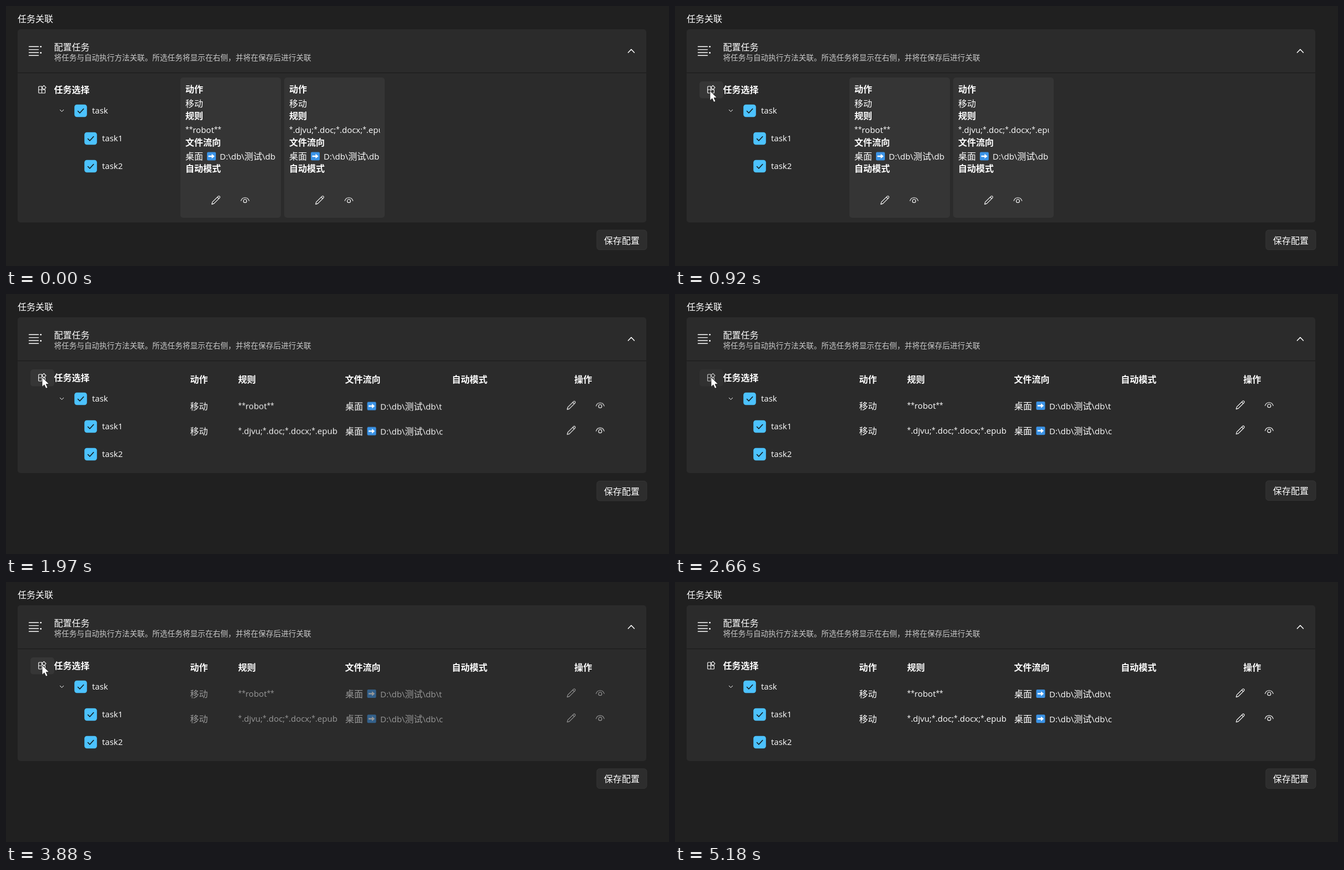
An HTML page that plays this animation: 1194 px wide and 469 px high, repeating every 5510 ms.

```html
<!DOCTYPE html>
<html lang="zh-CN">
<head>
<meta charset="utf-8">
<title>任务关联</title>
<style>
html, body { margin: 0; width: 100%; height: 100%; overflow: hidden; background: #202020; }
svg { display: block; width: 100%; height: 100%; }
text { font: 15px "Open Sans", "Noto Sans CJK SC", "Noto Sans CJK", sans-serif; fill: #fff; }
.bold { font-weight: 700; }
.cjk { font-size: 16px; }
.star { font-size: 12px; baseline-shift: 2px; }
.note, .note .cjk { font-size: 13.64px; fill: #c8c8c8; }
.line { fill: none; stroke: #fff; stroke-width: 1.1; stroke-linecap: round; stroke-linejoin: round; }
</style>
</head>
<body>
<svg id="stage" viewBox="0 0 1194 469"></svg>
<script>
const LOOP = 5510;
const SWAPS = [
  { at: 1490, view: 'table', span: 690, slide: 20 },
  { at: 2820, view: 'cards', span: 320, slide: 0 },
  { at: 3880, view: 'table', span: 300, slide: 0 },
];
const PRESSES = [[1330, 1490], [2660, 2820], [3720, 3880]];
// Pointer stops: time, x, y
const POINTER = [
  [80, 560, 0], [200, 420, 90], [320, 200, 220], [440, 60, 305], [560, 74, 186],
  [600, 74, 186], [920, 63, 153], [1320, 63, 153], [1330, 65, 150], [4280, 65, 150],
  [4320, 160, 117], [4400, 303, 68], [4600, 600, -24],
];

// CJK, Latin and asterisk runs use slightly different sizes.
const runs = s => s.replace(/\*|[^\x00-\x7f]+/g,
  m => `<tspan class="${m === '*' ? 'star' : 'cjk'}">${m}</tspan>`);
const text = (x, y, s, cls = '') => `<text x="${x}" y="${y}" class="${cls}">${runs(s)}</text>`;
const rect = (x, y, w, h, fill, r = 0, more = '') =>
  `<rect x="${x}" y="${y}" width="${w}" height="${h}" rx="${r}" fill="${fill}" ${more}/>`;
const line = (d, more = '') => `<path class="line" d="${d}" ${more}/>`;
const at = (x, y, s) => `<g transform="translate(${x} ${y})">${s}</g>`;

const pencil = (x, y) => at(x, y, line('M-7.4 7.6L-6.3 3.7L4 -6.6Q5.4 -7.9 6.8 -6.6Q8 -5.3 6.8 -3.9L-3.5 6.4ZM2.6 -5.2L5.4 -2.5'));
const eye = (x, y) => at(x, y,
  line('M-7.3 1.4C-5 -6.2 5 -6.2 7.3 1.4') + '<circle class="line" cy="1.7" r="3"/>');
const arrow = (x, y) => at(x, y,
  rect(-8, -7.5, 16, 15, '#3b93e6', 2) +
  '<path d="M-5.5 -1.2H.5V-4.3L5.7 0L.5 4.3V1.2H-5.5Z" fill="#fff"/>');
const check = (x, y, label) =>
  rect(x - 11.3, y - 11.3, 22.6, 22.6, '#4cc2ff', 4.5) +
  at(x, y, line('M-5 .5L-1.6 4L5.2 -3.4', 'style="stroke:#111;stroke-width:1.5"')) +
  text(x + 20.5, y + 5, label);

const card = (x, rule) => at(x, 0,
  rect(0, 129, 181, 253, '#353535', 5) +
  text(9, 156, '动作', 'bold') + text(9, 182.3, '移动') +
  text(9, 204, '规则', 'bold') +
  `<g clip-path="url(#cardClip)">${text(9, 229, rule)}</g>` +
  text(9, 251.5, '文件流向', 'bold') + text(9, 277, '桌面') + arrow(56, 271) +
  text(71, 277, 'D:\\db\\测试\\db') +
  text(9, 299, '自动模式', 'bold') + pencil(64, 350) + eye(116.5, 350));

const row = (y, rule, path) =>
  text(331.5, y + 6, '移动') + text(418, y + 5.5, rule) +
  text(611, y + 6, '桌面') + arrow(658.5, y) +
  `<g clip-path="url(#pathClip)">${text(674, y + 6, path)}</g>` +
  pencil(1018, y - 1.5) + eye(1070, y - 1.5);

const heads = [[331.5, '动作'], [418, '规则'], [610.5, '文件流向'], [803, '自动模式'], [1023.5, '操作']];
const $ = id => document.getElementById(id);

$('stage').innerHTML = `
<defs>
  <clipPath id="cardClip"><rect x="9" y="205" width="163.5" height="32"/></clipPath>
  <clipPath id="pathClip"><rect x="674" y="180" width="113.5" height="100"/></clipPath>
</defs>
${rect(21, 42, 1132, 348.5, '#2b2b2b', 5, 'id="panel"')}
${rect(21, 119.8, 1132, 1.4, '#1e1e1e')}
${text(21, 28.5, '任务关联')}
${text(86.5, 79.5, '配置任务')}
${text(86.5, 98, '将任务与自动执行方法关联。所选任务将显示在右侧，并将在保存后进行关联', 'note')}
${line('M41.5 73.3H58.5M41.5 78.6H58.5M41.5 84H58.5M41.5 89.3H58.5', 'style="stroke-width:1.4"')}
<circle cx="62.7" cy="73.3" r="1.4" fill="#fff"/><circle cx="62.7" cy="84.5" r="1.4" fill="#fff"/>
${line('M1120.5 84L1126 78.3L1131.5 84', 'style="stroke-width:1.5"')}
${rect(44, 136, 43, 30.5, '#363636', 5, 'id="hover"')}
<g id="grid">${line('M58.7 146Q58.7 145 59.7 145H64.5V157H59.7Q58.7 157 58.7 156ZM58.7 151H70.5V156Q70.5 157 69.5 157H64.5M68.3 143.4L72 147.1L68.3 150.8L64.6 147.1Z')}</g>
${text(86.5, 157, '任务选择', 'bold')}
${line('M97.3 187.3L100.5 190.5L103.7 187.3', 'style="stroke-width:1"')}
${check(134.5, 189, 'task')}${check(152.5, 239, 'task1')}${check(152.5, 289, 'task2')}
<g id="cards">${card(314, '**robot**')}${card(501, '*.djvu;*.doc;*.docx;*.epub')}</g>
<g id="table">
  ${heads.map(([x, s]) => text(x, 160.3, s, 'bold')).join('')}
  <g id="rows">${row(201.5, '**robot**', 'D:\\db\\测试\\db\\t')}${row(246.7, '*.djvu;*.doc;*.docx;*.epub', 'D:\\db\\测试\\db\\c')}</g>
</g>
<g id="save">
  ${rect(1064, 404.2, 90, 35.5, '#2d2d2d', 5, 'stroke="#353535"')}
  ${text(1077, 428.5, '保存配置')}
</g>
<path id="pointer" d="M0 0V17.5L4 13.8L6.9 20.3L10 19L7.2 12.6H12.7Z" fill="#fff" stroke="#111" stroke-width=".8"/>`;

const stepped = (t, start) => start + Math.floor((t - start) / 40) * 40;
const show = (id, on) => $(id).style.display = on ? '' : 'none';
const shift = (id, x, y) => $(id).setAttribute('transform', `translate(${x} ${y})`);

function drawPointer(t) {
  const moving = t < 1320 || t >= 4280;
  const time = moving ? stepped(t, 0) : t;
  const i = POINTER.findIndex(p => p[0] > time);
  show('pointer', i > 0);
  if (i < 1) return;
  const [a, b] = [POINTER[i - 1], POINTER[i]];
  const k = (time - a[0]) / (b[0] - a[0]);
  shift('pointer', a[1] + (b[1] - a[1]) * k, a[2] + (b[2] - a[2]) * k);
}

function draw(t) {
  const swap = SWAPS.filter(s => s.at <= t).pop() || { at: -1000, view: 'cards', span: 1, slide: 0 };
  const isTable = swap.view === 'table';
  const left = 1 - Math.min(1, (stepped(t, swap.at) + (swap.slide ? 0 : 40) - swap.at) / swap.span);
  const offset = swap.slide * left ** 3;
  const opacity = 1 - left ** 5;

  show('cards', !isTable);
  show('table', isTable);
  $('panel').setAttribute('height', isTable ? 281 : 348.5);
  $('cards').style.opacity = isTable ? 1 : opacity;
  $('rows').style.opacity = isTable ? opacity : 1;
  shift('rows', 0, offset);
  shift('save', 0, isTable ? offset - 67.3 : 0);

  const pressed = PRESSES.some(([from, to]) => t >= from && t < to);
  $('grid').style.opacity = pressed ? 0.75 : 1;
  show('hover', t >= 560 && t < 4440);
  $('hover').style.opacity = pressed ? 0.6 : 1;
  drawPointer(t);
}

const begin = performance.now();
function tick() {
  draw((performance.now() - begin) % LOOP);
  requestAnimationFrame(tick);
}
tick();
</script>
</body>
</html>
```
